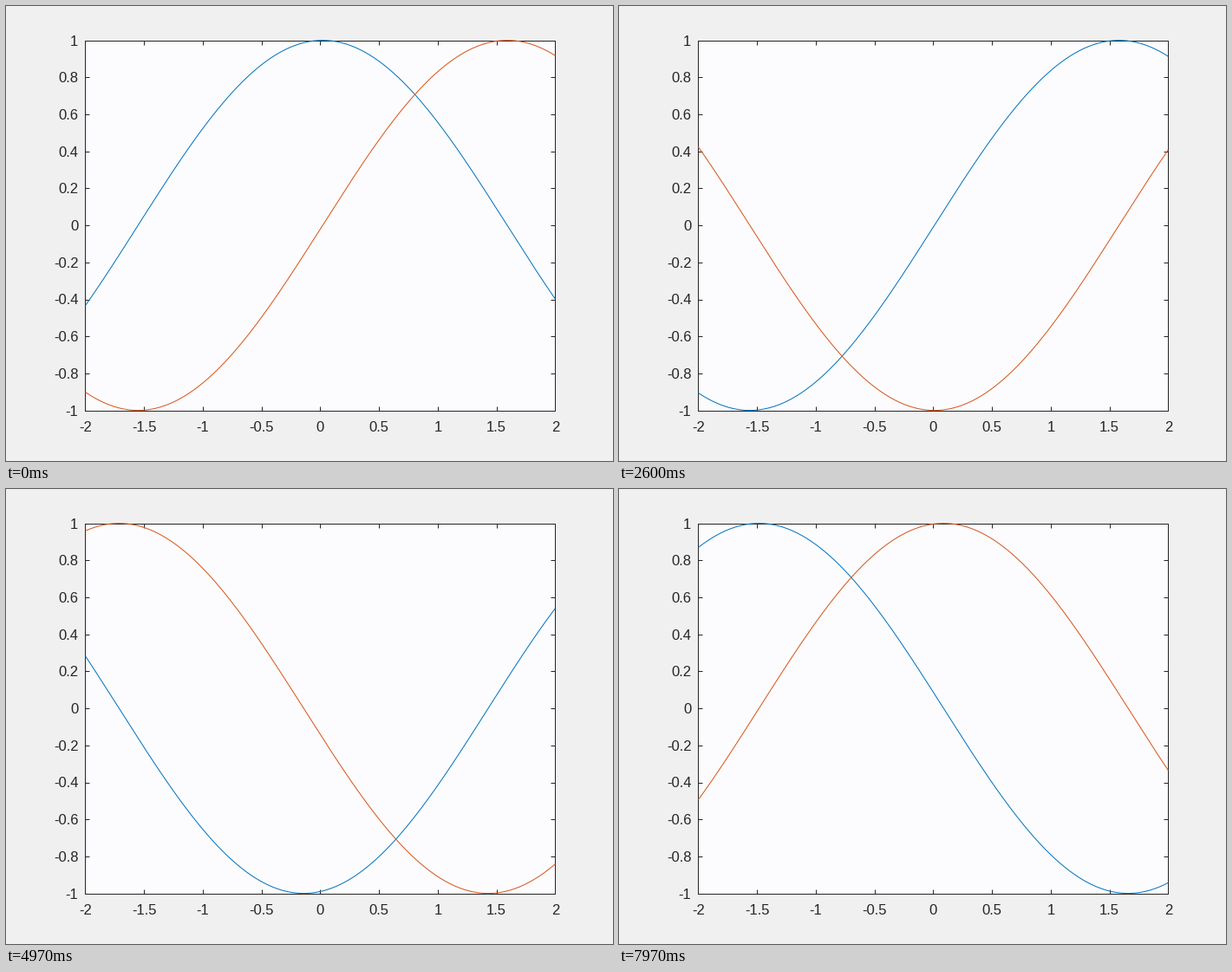
Write a matplotlib script that moves like this. It is 700 px wide and 525 px high and loops after 8000 ms.

```python
import numpy as np
import matplotlib.pyplot as plt
from matplotlib.animation import FuncAnimation

W, H, DPI = 700, 525, 100
LEFT, RIGHT, TOP, BOTTOM = 91.4, 633.4, 39.6, 466.6
LOOP_MS, TICK_MS = 8000, 20
STEP_MS = 100 / 3  # the curves move 30 times a second
SHIFT = 0.02  # phase advance per step
PX = 72 / DPI  # one pixel in points

PAPER, PLOT, INK = "#f0f0f0", "#fcfcfe", "#262626"
BLUE, ORANGE = "#0072bd", "#d95319"

plt.rcParams["font.family"] = "Liberation Sans"

fig = plt.figure(figsize=(W / DPI, H / DPI), dpi=DPI, facecolor=PAPER)
ax = fig.add_axes(
    [LEFT / W, 1 - BOTTOM / H, (RIGHT - LEFT) / W, (BOTTOM - TOP) / H],
    facecolor=PLOT,
)
ax.set_xlim(-2, 2)
ax.set_ylim(-1, 1)

xticks = np.arange(-4, 5) / 2
yticks = np.arange(-5, 6) / 5
ax.set_xticks(xticks, [f"{v:g}" for v in xticks])
ax.set_yticks(yticks, [f"{v:g}" for v in yticks])
ax.tick_params(direction="in", top=True, right=True, length=5 * PX, width=PX,
               color=INK, labelcolor=INK, labelsize=12)
ax.tick_params(axis="x", pad=12 * PX)
ax.tick_params(axis="y", pad=8 * PX)
for spine in ax.spines.values():
    spine.set(color=INK, linewidth=PX)

x = np.linspace(-2, 2, 201)


def curve(color):
    return ax.plot(x, np.zeros_like(x), color=color, linewidth=PX,
                   solid_capstyle="butt", clip_on=False, zorder=3)[0]


cos_line, sin_line = curve(BLUE), curve(ORANGE)


def update(i):
    # step starts are rounded to 10 ms, hence the small lead
    t = (i + 0.5) * TICK_MS + 4
    step = int(t / STEP_MS)
    phase = x - SHIFT * (step + 1)
    cos_line.set_ydata(np.cos(phase))
    sin_line.set_ydata(np.sin(phase))
    return cos_line, sin_line


anim = FuncAnimation(fig, update, frames=LOOP_MS // TICK_MS,
                     init_func=lambda: update(0), interval=TICK_MS,
                     repeat=True, repeat_delay=0)
plt.show()
```
